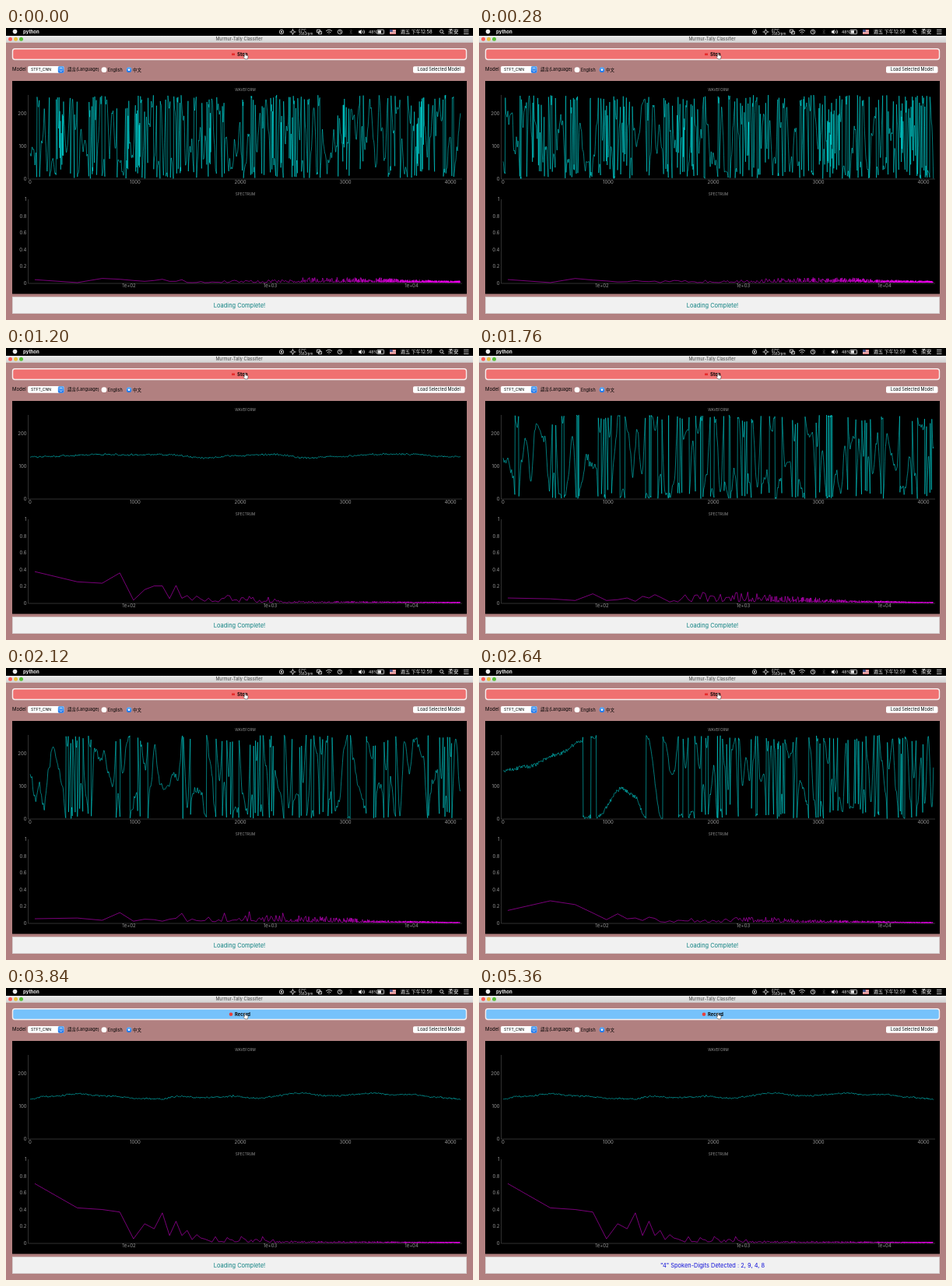
Write an HTML page that moves like this. It is 600x375 px and loops after 5400 ms.

```html
<!DOCTYPE html>
<html>
<head>
<meta charset="utf-8">
<title>Murmur-Tally Classifier</title>
<style>
html, body { margin: 0; width: 100%; height: 100%; overflow: hidden; background: #b18080; }
svg { display: block; width: 600px; height: 375px; font: 5.5px Inter, "Noto Sans CJK TC", "Noto Sans CJK", sans-serif; }
.mid { text-anchor: middle; }
.tick { font-size: 6px; fill: #969696; }
.cap { font-size: 4.6px; fill: #969696; text-anchor: middle; }
.bold { font-weight: 700; }
.line { fill: none; stroke-width: .48; stroke-linejoin: bevel; }
.icon { fill: none; stroke: #eee; stroke-width: .8; }
</style>
</head>
<body>
<svg viewBox="0 0 600 375">
  <defs>
    <linearGradient id="bar" x2="0" y2="1"><stop stop-color="#ebebeb"/><stop offset="1" stop-color="#d2d2d2"/></linearGradient>
    <linearGradient id="blue" x2="0" y2="1"><stop stop-color="#62aef6"/><stop offset="1" stop-color="#1a72ea"/></linearGradient>
  </defs>
  <rect width="600" height="375" fill="#b18080"/>

  <!-- menu bar -->
  <rect width="600" height="10"/>
  <circle cx="11.5" cy="4.6" r="2.8" fill="#eee"/>
  <g fill="#f2f2f2">
    <text x="22" y="7" class="bold" font-size="6">python</text>
    <text x="376" y="4.6" font-size="4.2">67°C</text>
    <text x="376" y="9" font-size="4.2">3582rpm</text>
    <text x="466" y="6.8" font-size="5">48%</text>
    <text x="507" y="7" font-size="6" id="clock"></text>
    <text x="568" y="7" font-size="6.8">柔安</text>
    <path d="M453 3.6h1.6l2-1.6v6l-2-1.6H453z"/>
    <rect x="478" y="3.3" width="4" height="3.4"/>
    <circle cx="354" cy="5" r="1.1"/>
  </g>
  <g class="icon">
    <circle cx="354" cy="5" r="2.7"/>
    <circle cx="368.5" cy="5" r="1.8"/>
    <path d="M368.5 1v2M368.5 7v2M364.5 5h2M370.5 5h2"/>
    <path d="M399.5 2.2h4v3.6h-4zM401.500 4.200h4v3.600h-4z"/>
    <path d="M411 4q4-3.400 8 0M412.600 5.800q2.400-2 4.800 0M414.500 7.500h1"/>
    <circle cx="429" cy="5" r="2.8"/><path d="M429 3v2l1.500 1"/>
    <path d="M441.500 3.500l3 3-1.500 1.500V2l1.500 1.500-3 3" stroke="#555" stroke-width=".5"/>
    <path d="M458 3.500q1.200 1.500 0 3M459.700 2.500q2 2.500 0 5"/>
    <rect x="477" y="2.300" width="8.500" height="5.400" rx=".8"/>
    <circle cx="559.500" cy="4.300" r="2"/><path d="M561 5.900l2 2"/>
    <path d="M588 2.500h6.500M588 5h6.500M588 7.500h6.500"/>
  </g>
  <rect x="493" y="2" width="8" height="6" fill="#eee"/>
  <path d="M493 2.500h8M493 4.300h8M493 6h8M493 7.600h8" stroke="#d2434a" stroke-width=".8"/>
  <rect x="493" y="2" width="3.800" height="3" fill="#3b4b86"/>

  <!-- title bar -->
  <rect y="10" width="600" height="8.800" fill="url(#bar)"/>
  <circle cx="5.500" cy="14.300" r="2.500" fill="#fc5b57"/>
  <circle cx="12.500" cy="14.300" r="2.500" fill="#e5bf3c"/>
  <circle cx="19.500" cy="14.300" r="2.500" fill="#57c038"/>
  <text x="299.500" y="16.300" class="mid" fill="#444">Murmur-Tally Classifier</text>

  <!-- controls -->
  <rect id="button" x="8.500" y="26.700" width="583" height="13.800" rx="3" stroke="#f7eeee" stroke-width="1.400"/>
  <g id="stop">
    <rect x="290" y="32.500" width="4" height="2.600" fill="#e62b2b"/>
    <text x="297" y="36" class="bold" font-size="6">Stop</text>
  </g>
  <g id="record">
    <circle cx="289" cy="33.800" r="2.300" fill="#e8403c"/>
    <text x="294" y="36" class="bold" font-size="5.800">Record</text>
  </g>
  <path d="M306.300 32.500q.8-.8 1.500 0v2.300l2.500.6q1 .3.8 1.500l-.7 3h-3.200l-2.200-2.700q.1-1 1.300-.4z" fill="#fff" stroke="#222" stroke-width=".5"/>

  <text x="8" y="55.300" font-size="6">Model</text>
  <rect x="28" y="49" width="46.500" height="8.800" rx="1.800" fill="#fff"/>
  <rect x="66.800" y="49" width="7.700" height="8.800" rx="1.800" fill="url(#blue)"/>
  <path d="M69 52.600l1.600-1.600 1.600 1.600M69 54.400l1.600 1.600 1.600-1.600" fill="none" stroke="#fff" stroke-width=".7"/>
  <text x="32" y="55.300" font-size="5.100">STFT_CNN</text>
  <text x="79" y="55.400">語言(Language)</text>
  <circle cx="126" cy="53.700" r="3.400" fill="#fff"/>
  <text x="131" y="55.500">English</text>
  <circle cx="158" cy="53.700" r="3.400" fill="url(#blue)"/>
  <circle cx="158" cy="53.700" r="1.200" fill="#fff"/>
  <text x="163" y="55.500">中文</text>
  <rect x="523" y="49.200" width="66.500" height="8.500" rx="1.800" fill="#fff"/>
  <text x="556.300" y="55.400" class="mid">Load Selected Model</text>

  <!-- plots -->
  <rect x="8" y="68" width="584" height="273.500"/>
  <text x="307.500" y="81.300" class="cap">WAVEFORM</text>
  <text x="307.500" y="215.200" class="cap">SPECTRUM</text>
  <path d="M28.500 86V194H586M28.500 220V328H586" fill="none" stroke="#606060" stroke-width=".5"/>
  <g id="ticks"></g>
  <path id="wave" class="line" stroke="#0ff"/>
  <path id="spec" class="line" stroke="#f0f"/>

  <!-- message -->
  <rect x="8.500" y="345.500" width="583" height="21" fill="#f1f1f1" stroke="#d8d0d0"/>
  <text id="message" x="300" y="358.900" class="mid" font-size="7.450"></text>
</svg>
<script>
const LOOP = 5400, STEP = 80, STOP_AT = 3480, RESULT_AT = 4800, CLOCK_AT = 400;
const $ = id => document.getElementById(id);
const clamp = v => Math.max(0, Math.min(1, v));

const hash = (n, seed) => {
  const v = Math.sin(n * 127.1 + seed * 311.7 + 17.3) * 43758.5453;
  return v - Math.floor(v);
};
// smooth noise in -1..1
const noise = (x, seed) => {
  const i = Math.floor(x), f = x - i, u = f * f * (3 - 2 * f);
  return 2 * (hash(i, seed) * (1 - u) + hash(i + 1, seed) * u) - 1;
};
// eased interpolation through x, y pairs
const curve = (x, p) => {
  if (x <= p[0]) return p[1];
  for (let i = 2; i < p.length; i += 2) {
    if (x > p[i]) continue;
    const f = (x - p[i - 2]) / (p[i] - p[i - 2]);
    return p[i - 1] + (p[i + 1] - p[i - 1]) * (1 - Math.cos(Math.PI * f)) / 2;
  }
  return p[p.length - 1];
};

const SWELL = [0, 40, 600, 45, 1200, 65, 1437, 80, 1700, 70, 2000, 90, 2200, 110, 2700, 90, 3200, 62, 4096, 40];
const ONSET = [0, 148, 250, 160, 500, 195, 755, 236, 765, 262, 830, 262, 842, 250, 880, 250, 890, 262,
  1130, 348, 1250, 325, 1355, 262, 1370, 250, 1510, 3, 1540, -20, 1600, -120, 1700, -20];
const PITCH = [0, -15, .04, 25, .09, 264, .2, 185, .35, 243, .52, 155, .62, 170, .8, 232, .88, 195, 1, -15];
const HUM = [0, 122, 140, 129, 510, 137, 700, 130, 1100, 123, 1250, 121, 1420, 130, 1630, 125, 1950, 130,
  2150, 124, 2580, 139, 2850, 131, 3290, 139, 3420, 135, 3600, 136, 3850, 127, 4096, 122];

// s: sample index, q: variant; results wrap around one byte
const waves = [
  (s, q) => {
    const p = (s - 289 + q * 211) / 690, d = p - Math.round(p);
    return 128 + (185 + 480 * Math.exp(-((d / .15) ** 2))) * noise(s / 27, q) + 30 * noise(s / 9, q + 5);
  },
  (s, q) => {
    const u = s + q * 230;
    const burst = (u > 1437 && u < 1570) || (u > 2222 && u < 2275);
    const a = curve(s, SWELL) * (.78 + .3 * Math.sin(u / 95));
    return 126 + 25 * (s / 4096) ** 6 + a * Math.sin(u * 2 * Math.PI / 52) + 8 * noise(s / 9, q)
      + (burst ? 260 * noise(s / 9, q + 3) : 0);
  },
  (s, q) => 130 + (clamp(s / 200) * (150 + 200 * Math.abs(noise(s / 260, q + 2)))) * noise(s / 44, q)
    + 14 * noise(s / 9, q + 4),
  (s, q) => curve(s, ONSET) + 6 * noise(s / 6, q) + clamp((s - 1600) / 350) * 310 * noise(s / 34, q + 7),
  (s, q) => {
    const p = (s - 118 + q * 170) / 718, u = s + q * 170;
    return curve(p - Math.floor(p), PITCH) + 18 * noise(s / 60, q) + 3 * noise(s / 9, q)
      + (u > 1100 && u < 1195 ? 220 * noise(s / 10, q + 1) : 0);
  },
  (s, q) => (q ? 128 + 9 * noise(s / 330, q) : curve(s, HUM)) + 2.2 * noise(s / 14, q) + 1.5 * noise(s / 4, q)
];

// low: first bins, env: peak level against x
const spectra = [
  { low: [.04, .005, .055, .045, .03, .02, .03, .045, .02, .02, .04],
    env: [200, .03, 350, .04, 390, .07, 480, .065, 520, .04, 584, .028] },
  { low: [.055, .028, .03, .035, .04, .03, .045, .06, .03, .045],
    env: [200, .05, 330, .06, 385, .1, 420, .2, 460, .1, 500, .06, 584, .02] },
  { low: [.06, .05, .03, .11, .03, .04, .06, .02, .08, .06, .1],
    env: [200, .09, 330, .14, 400, .08, 500, .03, 584, .012] },
  { low: [.15, .265, .22, .12, .04, .11, .05, .06, .03, .07],
    env: [200, .08, 260, .07, 350, .08, 430, .04, 584, .012] },
  { low: [.075, .03, .015, .06, .05, .09, .07, .03, .07, .12, .19, .03], peak: 34,
    env: [200, .06, 340, .13, 400, .09, 450, .04, 584, .01] },
  { low: [.71, .42, .4, .37, .05, .23, .17, .36, .09, .26, .09, .15, .04, .1, .06],
    env: [200, .1, 250, .1, 330, .08, 360, .025, 584, .014] }
];

// first step, kind, step of variant 0
const plan = [[0, 0, 0], [4, 5, 1], [7, 1, 9], [11, 0, 0], [15, 5, 1], [18, 2, 22], [28, 5, 1],
  [32, 3, 33], [34, 4, 37], [40, 5, 1], [43, 5, 43]];

const path = pts => "M" + pts.map(([x, y]) => x.toFixed(2) + " " + y.toFixed(2)).join("L");

function plot(step) {
  const [, kind, base] = plan.filter(p => p[0] <= step).pop(), q = step - base;
  const pts = [];
  for (let s = 0; s <= 4096; s += 3) {
    const v = waves[kind](s, q);
    pts.push([31 + s * .135, 193.5 - .42 * (v - 256 * Math.floor(v / 256))]);
  }
  $("wave").setAttribute("d", path(pts));

  const { low, env, peak } = spectra[kind], bins = [];
  for (let k = 1; k <= 1024; k++) {
    const x = 158 + 181.5 * Math.log10(k * .2153), h = hash(k, q + kind * 9);
    let v = k <= low.length ? low[k - 1] * (q ? .5 + h * .7 : 1) : curve(x, env) * (.12 + .88 * h * h);
    if (k === peak) v = .25;
    bins.push([x, 327.5 - 107.5 * v]);
  }
  $("spec").setAttribute("d", path(bins));
}

function tick(x, y, label, anchor) {
  return `<text class="tick" x="${x}" y="${y}" text-anchor="${anchor}">${label}</text>`;
}
let ticks = "";
for (let i = 0; i < 5; i++) ticks += tick(31 + i * 135, 199.6, i * 1000, "middle");
for (let i = 0; i < 3; i++) {
  ticks += tick(26.5, 195.8 - i * 42, i * 100, "end");
  ticks += tick(158 + i * 181.5, 333.4, "1e+0" + (i + 2), "middle");
}
for (let i = 0; i < 6; i++) ticks += tick(26.5, 329.8 - i * 21.5, i / 5, "end");
$("ticks").innerHTML = ticks;

let shown = -1;
function draw(now) {
  const t = now % LOOP, stopped = t >= STOP_AT, done = t >= RESULT_AT;
  const step = stopped ? 43 : Math.min(42, Math.floor(t / STEP));
  if (step !== shown) plot(shown = step);
  $("clock").textContent = "週五 下午12:" + (t < CLOCK_AT ? 58 : 59);
  $("button").setAttribute("fill", stopped ? "#76c2fb" : "#f07070");
  $("stop").setAttribute("visibility", stopped ? "hidden" : "visible");
  $("record").setAttribute("visibility", stopped ? "visible" : "hidden");
  $("message").textContent = done ? '"4" Spoken-Digits Detected : 2, 9, 4, 8' : "Loading Complete!";
  $("message").setAttribute("fill", done ? "#1010d8" : "#0d8080");
}

const start = performance.now();
function frame() {
  draw(performance.now() - start);
  requestAnimationFrame(frame);
}
frame();
</script>
</body>
</html>
```
